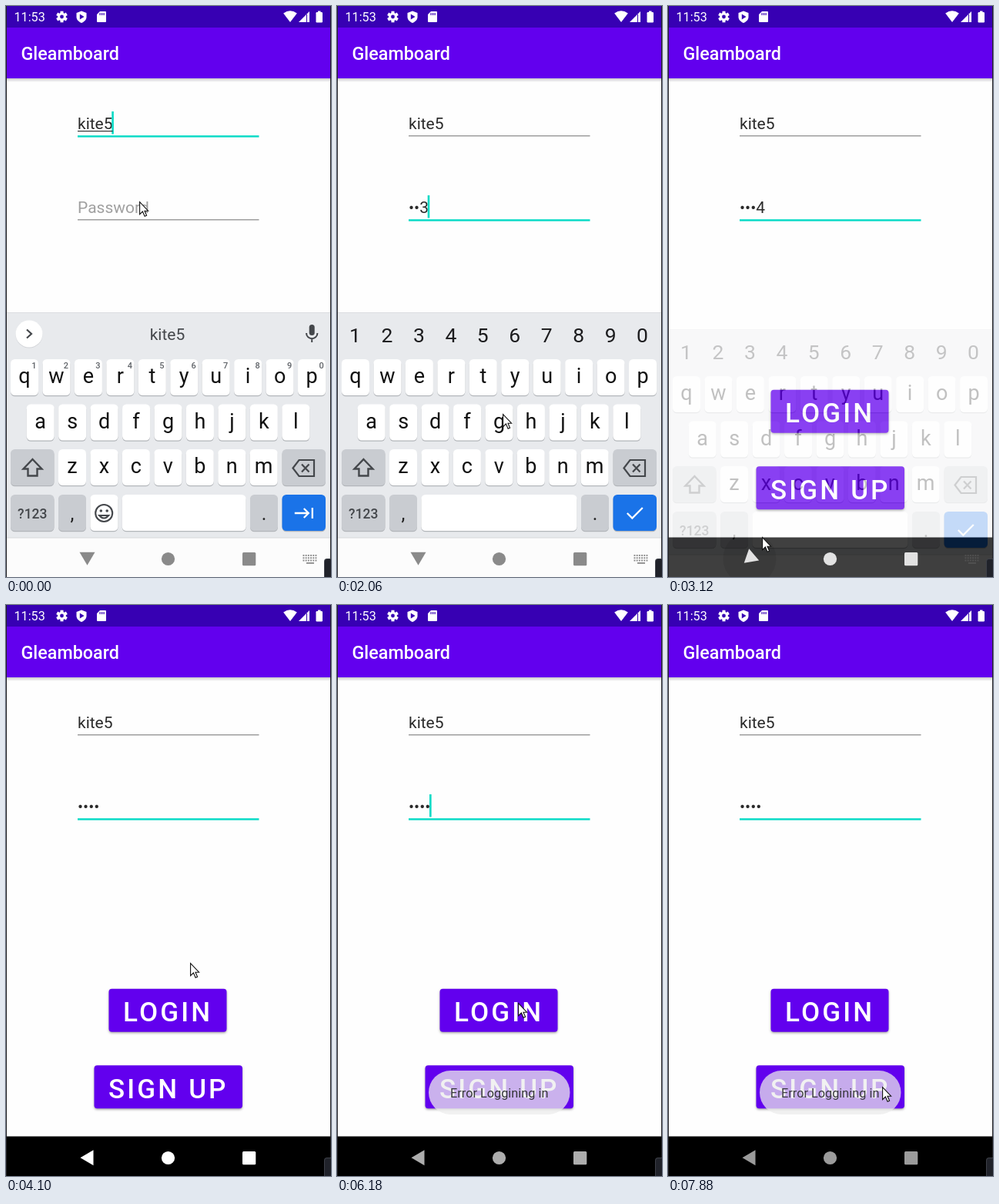
Recreate the animation shown at these times as an HTML page with a canvas. Size 422 by 742 pixels, loop 8 s.

```html
<!DOCTYPE html>
<html lang="en">
<head>
<meta charset="utf-8">
<title>Login screen</title>
<style>
html, body { margin: 0; width: 100%; height: 100%; overflow: hidden; background: #fff; }
canvas { display: block; width: 422px; height: 742px; }
</style>
</head>
<body>
<canvas id="stage" width="422" height="742"></canvas>
<script>
const W = 422, H = 742, LOOP = 8000;
const APP_NAME = 'Gleamboard', USER = 'kite5';
const TEAL = '#03dac5', PURPLE = '#6200ee';
const screenCtx = document.getElementById('stage').getContext('2d');
const layer = document.createElement('canvas');
layer.width = W;
layer.height = H;
const layerCtx = layer.getContext('2d');
let g = screenCtx;

// Timed values: each entry holds from its time until the next one.
const POINTER = [
  [0, 173, 254], [120, 177, 256], [260, 173, 254], [770, -50, -50],
  [2060, 215, 530], [2180, 190, 578], [2300, 146, 660], [2420, 107, 724],
  [2580, 105, 721], [2720, 116, 713], [3120, 122, 690], [3240, 146, 620],
  [3360, 180, 520], [3480, 208, 425], [3600, 219, 385], [4100, 239, 465],
  [4250, 237, 506], [4390, 235, 517], [6540, 236, 520], [6780, 240, 535],
  [6900, 249, 560], [7020, 262, 588], [7140, 274, 608], [7260, 282, 620],
  [7380, 284, 624], [7500, 280, 625], [7620, 278, 626]
];
const CARET = [[0, 1], [120, 0], [260, 1], [2720, 0], [3240, 1], [3600, 0], [4250, 1],
  [4770, 0], [5200, 1], [5680, 0], [6180, 1], [6660, 0], [7140, 1], [7620, 0]];
const PASSWORD = [[0, ''], [770, '1'], [1470, '•2'], [1590, '••3'], [2180, '•••4'], [3600, '••••']];
// keyboard opacity, slide distance, turn of the back arrow, ripple opacity
const KEYBOARD = [[0, 1, 0, 0, 0], [3000, 0.84, 5, 0, 0.1], [3120, 0.25, 22, 0.55, 0.08],
  [3240, 0, 30, 1, 0.04], [3360, 0, 30, 1, 0]];
// ripple brightness, shadow size
const PRESS = [[0, 0, 3], [5050, 0.16, 7], [5200, 0.08, 6], [5320, 0, 3]];
const TOAST = [[0, 0], [5560, 0.15], [5680, 0.5], [5820, 0.85], [5940, 1], [7880, 0.97]];

const held = (list, t) => list.findLast(entry => entry[0] <= t).slice(1);

function text(str, x, y, size, color, { weight = 400, align = 'left', spacing = 0 } = {}) {
  g.font = `${weight} ${size}px Roboto, sans-serif`;
  g.letterSpacing = spacing + 'px';
  g.textAlign = align;
  g.fillStyle = color;
  g.fillText(str, x, y);
}
function rect(x, y, w, h, color) {
  g.fillStyle = color;
  g.fillRect(x, y, w, h);
}
function round(x, y, w, h, r, color) {
  g.fillStyle = color;
  g.beginPath();
  g.roundRect(x, y, w, h, r);
  g.fill();
}
function disc(x, y, r, color) {
  g.fillStyle = color;
  g.beginPath();
  g.arc(x, y, r, 0, 7);
  g.fill();
}
function fillPath(d, color, x = 0, y = 0) {
  g.save();
  g.translate(x, y);
  g.fillStyle = color;
  g.fill(new Path2D(d));
  g.restore();
}
function strokePath(d, color, width, x = 0, y = 0) {
  g.save();
  g.translate(x, y);
  g.strokeStyle = color;
  g.lineWidth = width;
  g.stroke(new Path2D(d));
  g.restore();
}

function statusBar() {
  rect(0, 0, W, 28, '#3700b3');
  text('11:53', 10.5, 20, 16.2, '#fff');
  for (let i = 0; i < 6; i++) {
    g.save();
    g.translate(72.5, 14);
    g.rotate(i * Math.PI / 3);
    rect(-2, -7.3, 4, 5, '#fff');
    g.restore();
  }
  disc(72.5, 14, 5.4, '#fff');
  disc(72.5, 14, 2.4, '#3700b3');
  fillPath('M0-7.5 6.5-5V0C6.5 4 3.5 6.5 0 8-3.5 6.5-6.5 4-6.5 0V-5Z', '#fff', 98, 14);
  fillPath('M-2.2-3.6 3.6 0-2.2 3.6Z', '#3700b3', 98, 14);
  fillPath('M-2-7H5Q6-7 6-6V6Q6 7 5 7H-5Q-6 7-6 6V-3Z', '#fff', 124, 14);
  for (const x of [121.5, 124, 126.5]) rect(x, 9, 1.2, 3, '#3700b3');
  fillPath('M0 7.5-8.8-4Q0-10.5 8.8-4Z', '#fff', 369, 13.5);
  fillPath('M7-7V7H-7Z', '#fff', 387, 14);
  strokePath('M3.5-3V7', '#3700b3', 1, 387, 14);
  round(402.5, 8, 8.5, 13.5, 1.2, '#fff');
  rect(405, 6.5, 3.5, 2, '#fff');
}

function toolbar() {
  const shade = g.createLinearGradient(0, 94, 0, 99);
  shade.addColorStop(0, 'rgba(0,0,0,.2)');
  shade.addColorStop(1, 'rgba(0,0,0,0)');
  rect(0, 94, W, 5, shade);
  rect(0, 28, W, 66, PURPLE);
  text(APP_NAME, 19.5, 70, 23.3, '#fff', { weight: 500 });
}

function field(value, hint, baseline, focused, caret) {
  text(value || hint, 93, baseline, 21, value ? '#2a2a2a' : '#a0a0a0');
  const end = 93 + (value ? g.measureText(value).width : 1);
  if (focused) rect(93, baseline + 8.2, 235.5, 2.4, TEAL);
  else rect(93, baseline + 8.2, 235.5, 1.2, '#868686');
  if (focused && caret) rect(end - 1.3, baseline - 23, 2.6, 29.5, TEAL);
  return end;
}

function button(label, x, y, w, bright, depth) {
  g.save();
  g.shadowColor = 'rgba(0,0,0,.35)';
  g.shadowBlur = depth;
  g.shadowOffsetY = depth / 2;
  round(x, y, w, 56, 4, PURPLE);
  g.restore();
  if (bright) round(x, y, w, 56, 4, `rgba(255,255,255,${bright})`);
  text(label, x + 18.6, y + 42.3, 35, '#fff', { weight: 500, spacing: 3.125 });
}

function key(x, y, w, color = '#fff') {
  round(x, y + 1.3, w, 47, 5.5, '#b3b6ba');
  round(x, y, w, 47, 5.5, color);
}
function letterRow(letters, x, y) {
  [...letters].forEach((c, i) => {
    const left = x + i * 41.45;
    key(left, y, 36);
    text(c, left + 18, y + 31, 27, '#111', { align: 'center' });
  });
}

function keyboard(secure) {
  const gray = '#c9ccd1', ink = '#44474b', centre = { align: 'center' };
  rect(0, 398, W, 1, '#dcdee1');
  rect(0, 399, W, 292, '#e8eaed');
  rect(0, 691, W, 51, '#fcfcfc');
  rect(0, 690.5, W, 1, '#d8d9db');
  letterRow('qwertyuiop', 6, 459);
  letterRow('asdfghjkl', 26.7, 517.5);
  letterRow('zxcvbnm', 68, 576);
  [...'1234567890'].forEach((d, i) => {
    const x = 6 + i * 41.45;
    if (secure) text(d, x + 17.5, 436.5, 26.5, '#1c1c1e', centre);
    else text(d, x + 30.5, 470.5, 11, '#5f6368', { weight: 500, align: 'center' });
  });
  if (!secure) {
    disc(30, 427, 17.5, '#d2d4d8');
    disc(30, 426, 17.5, '#fff');
    strokePath('M-3-5.5 3 0-3 5.5', ink, 2.2, 30, 426);
    text(USER, 209.5, 433.5, 21, ink, centre);
    round(393.7, 414, 7, 14, 3.5, ink);
    strokePath('M-7.2-1C-7.2 8.5 7.2 8.5 7.2-1M0 6V11', ink, 2, 397.2, 426);
  }
  key(6, 576, 56.5, gray);
  strokePath('M0-11.5 12 1H6V10H-6V1H-12Z', ink, 2.4, 34.5, 600.5);
  key(358.5, 576, 56.5, gray);
  strokePath('M-14 0-6-10.5H13.5V10.5H-6ZM-2.5-5 7 5M7-5-2.5 5', ink, 2.2, 386.5, 600.5);
  key(6, 635, 56.5, gray);
  text('?123', 34.3, 666, 17.5, ink, { weight: 500, align: 'center' });
  key(68, 635, 36, gray);
  text(',', 86, 668, 25, '#222', centre);
  if (!secure) {
    key(109.4, 635, 36);
    strokePath('M11 0A11 11 0 1 1-11 0A11 11 0 1 1 11 0ZM-6 3Q0 10 6 3Z', ink, 2.1, 127.2, 659);
    disc(123.3, 656, 1.8, ink);
    disc(131.2, 656, 1.8, ink);
  }
  const spaceX = secure ? 109.4 : 150.8;
  key(spaceX, 635, 311.5 - spaceX);
  key(317, 635, 36, gray);
  text('.', 335, 668, 25, '#222', centre);
  key(358.5, 635, 56.5, '#1a73e8');
  strokePath(secure ? 'M-10 0-3.5 6.5 10-7' : 'M-12 0H6M0-6 6 0 0 6M11-7V7', '#fff', 2.3, 386.8, 659);
}

function navIcons(t, opacity, turn, ripple) {
  const dim = t < 5560 ? 1 : 1 - 0.4 * (1 - Math.exp(-(Math.min(t, 7260) - 5440) / 450));
  const level = Math.round((138 + 117 * (opacity > 0.5 ? 0 : 1 - opacity)) * dim);
  const color = `rgb(${level},${level},${level})`;
  if (ripple) {
    g.save();
    g.beginPath();
    g.rect(0, 691, W, 51);
    g.clip();
    disc(106, 718, 34.5, `rgba(0,0,0,${ripple})`);
    g.restore();
  }
  g.save();
  g.translate(105.5 - turn * 0.5, 718.3);
  g.rotate(turn * Math.PI / 2);
  fillPath('M-10-8.5H10L0 8.5Z', color);
  g.restore();
  disc(210.5, 718.5, 8.6, color);
  round(307, 710, 17.3, 17.3, 1.5, color);
  g.globalAlpha = opacity;
  for (let row = 0; row < 3; row++) {
    for (let col = 0; col < 6; col++) rect(385.5 + col * 3.2, 713 + row * 3.3, 1.9, 1.9, '#8a8a8a');
  }
  rect(390, 723, 10, 1.8, '#8a8a8a');
  g.globalAlpha = 1;
}

function toast(alpha) {
  if (!alpha) return;
  g.globalAlpha = alpha;
  round(119, 605, 183.5, 57, 28.5, 'rgba(236,236,236,.75)');
  text('Error Loggining in', 210.7, 640.3, 16.3, '#36363a', { align: 'center' });
  g.globalAlpha = 1;
}

function pointer(x, y) {
  const arrow = 'M.6.6V16.6L4.4 13 7.1 19.3 9.6 18.2 7 12.2H11.6Z';
  fillPath(arrow, '#fff', x, y);
  strokePath(arrow, '#111', 1.1, x, y);
}

function draw(now) {
  const t = now % LOOP;
  const [caret] = held(CARET, t);
  const [opacity, slide, turn, ripple] = held(KEYBOARD, t);
  const onPassword = t >= 260;

  g = screenCtx;
  rect(0, 0, W, H, '#fefefe');
  toolbar();
  statusBar();
  const userEnd = field(USER, '', 160, !onPassword, caret);
  if (!onPassword) rect(93, 162, userEnd - 93, 1.2, '#333');
  field(held(PASSWORD, t)[0], 'Password', 269, onPassword, caret);
  // The buttons sit behind the keyboard and show as it fades.
  button('LOGIN', 133.5, 498.7, 153, ...held(PRESS, t));
  button('SIGN UP', 114.5, 598.2, 192.5, 0, 3);
  rect(0, 690.5, W, 51.5, '#000');

  if (opacity) {
    g = layerCtx;
    g.clearRect(0, 0, W, H);
    keyboard(t >= 630);
    g = screenCtx;
    g.globalAlpha = opacity;
    g.drawImage(layer, 0, slide);
    if (slide) rect(0, 742 - slide, W, 0, '#000');
    g.globalAlpha = 1;
  }
  navIcons(t, opacity, turn, ripple);
  toast(held(TOAST, t)[0]);

  rect(0, 0, 1, H, '#202024');
  rect(421, 0, 1, H, '#202024');
  round(413, 718, 12, 28, 4, '#3d4048');
  round(414, 719, 12, 28, 3, '#20222a');
  pointer(...held(POINTER, t));
}

const start = performance.now();
function tick() {
  draw(performance.now() - start);
  requestAnimationFrame(tick);
}
tick();
</script>
</body>
</html>
```
